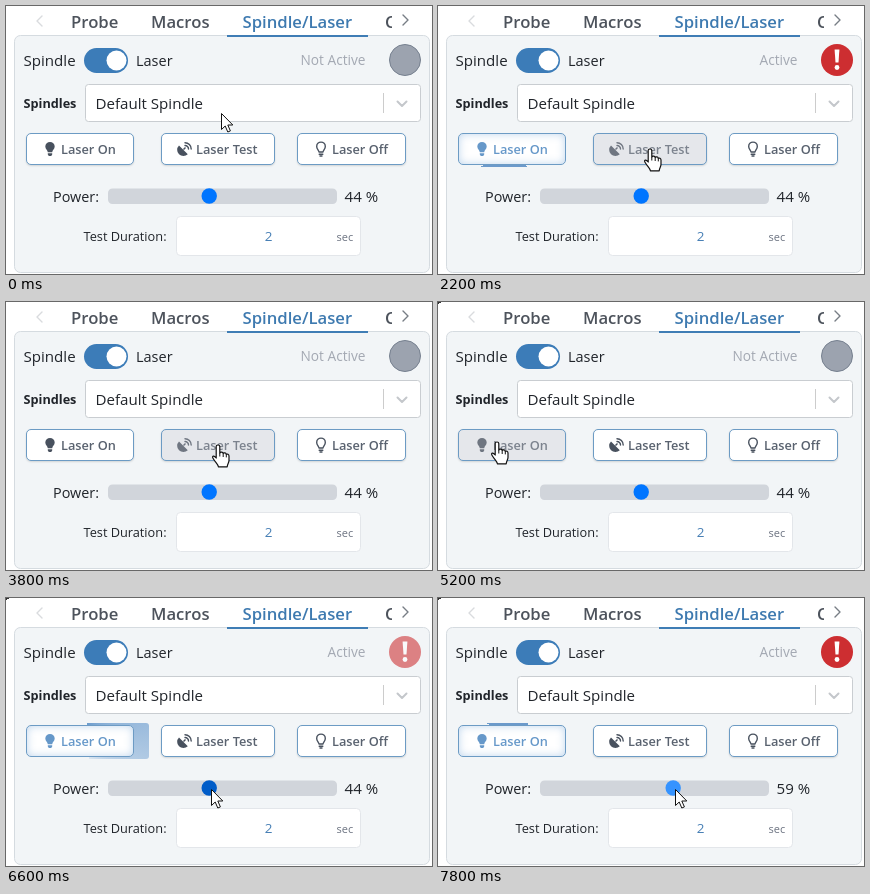
Animation of 426 by 268 pixels, one loop 8 s. Source, as an HTML page:

```html
<!DOCTYPE html>
<html lang="en">
<head>
<meta charset="utf-8">
<title>Laser controls</title>
<style>
  html, body { margin: 0; width: 100%; height: 100%; overflow: hidden; background: #fff; }
  svg { position: absolute; left: 0; top: 0; font-family: "Open Sans", "Noto Sans", sans-serif; font-size: 15.1px; fill: #20242a; }
  .glow { position: absolute; left: 18px; top: 125px; width: 125px; height: 36px; border-radius: 3px; }
  .button {
    position: absolute; top: 127px; height: 32px; box-sizing: border-box;
    border: 1px solid #6c9bc4; border-radius: 5px; background: #fff;
    box-shadow: 0 1px 2px #0002;
  }
  .button.hover { background: #e5e7eb; }
  .button.active { box-shadow: inset 0 0 9px #6fa2d670; }
  .tab { font-weight: 600; font-size: 16.7px; fill: #4d535c; }
  .label { font-weight: 600; font-size: 12.75px; fill: #59626f; }
  .icon { fill: #48515e; stroke: none; }
  .line { fill: none; stroke-width: 1.4; stroke-linecap: round; stroke-linejoin: round; }
  .on .label, .on .icon { fill: #6698c9; }
  .dim { opacity: .75; }
</style>
</head>
<body>
<svg width="426" height="268">
  <rect x="8.5" y="29.5" width="415" height="237" rx="6" fill="#f2f5f7" stroke="#d5dbe0"/>
  <path class="line" d="M36 10l-5 5 5 5" stroke="#d9dbde"/>
  <path class="line" d="M397 9l5 5-5 5" stroke="#777d85"/>
  <g class="tab">
    <text x="65" y="22">Probe</text>
    <text x="145" y="22">Macros</text>
    <text x="236.5" y="22" fill="#3e7ab0" style="fill:#3e7ab0">Spindle/Laser</text>
    <svg x="378" y="0" width="8" height="28"><text x="1" y="22" class="tab">C</text></svg>
  </g>
  <rect x="221" y="29" width="141" height="2" fill="#3f7db5"/>

  <text x="17.5" y="60">Spindle</text>
  <rect x="78" y="42" width="44" height="25" rx="12.5" fill="#3c7cb8"/>
  <circle cx="110.5" cy="54.5" r="10" fill="#fff"/>
  <text x="130" y="60" font-size="14.5">Laser</text>
  <text id="status" x="359.5" y="59" font-size="13.7" text-anchor="end" fill="#a3a8b2"></text>
  <circle id="idle" cx="399" cy="54" r="15.5" fill="#9ca3af" stroke="#76808f"/>
  <g id="alert">
    <circle cx="399" cy="54" r="16" fill="#cd2e31"/>
    <path d="M396.6 43.5h4.8l-.9 13h-3z" fill="#fff"/>
    <circle cx="399" cy="61.5" r="2.4" fill="#fff"/>
  </g>

  <text x="17.5" y="102" font-size="12.7" font-weight="700">Spindles</text>
  <rect x="79.5" y="78.5" width="335" height="37" rx="3" fill="#fff" stroke="#c9cdd1"/>
  <text x="89.5" y="103">Default Spindle</text>
  <path d="M377.5 87v20" stroke="#ccc"/>
  <path class="line" d="M391.5 95.5l4.5 4.5 4.5-4.5" stroke="#c4c7cb" style="stroke-width:2"/>

  <text x="47" y="196" font-size="14.4">Power:</text>
  <rect x="102" y="182.5" width="229" height="15.5" rx="4.5" fill="#d1d5db"/>
  <circle id="thumb" cy="190" r="7.7"/>
  <text id="percent" x="338.5" y="196"></text>
  <text x="77.5" y="235" font-size="12.75">Test Duration:</text>
  <rect x="170.5" y="210.5" width="184" height="39" rx="4" fill="#fff" stroke="#e3e6ea"/>
  <text x="262.5" y="235" font-size="13.5" text-anchor="middle" fill="#477fb5">2</text>
  <text x="330.5" y="235" font-size="11" fill="#6b7280">sec</text>
  <path id="corner" d="M0 0h3v1h-2v1h-1z" fill="#333"/>
</svg>

<div class="glow" id="glow"></div>
<div class="button" id="onButton" style="left:20px;width:108px"></div>
<div class="button" id="testButton" style="left:155px;width:114px"></div>
<div class="button" style="left:291px;width:109px"></div>

<svg width="426" height="268">
  <defs>
    <path id="bulb" d="M-2.2 3.2C-2.4 1.4-4.7.2-4.7-2.4a4.7 4.7 0 0 1 9.4 0C4.7.2 2.4 1.4 2.2 3.2zM-2.2 4.2h4.4v1.4L1.2 7h-2.4l-1-1.4z"/>
  </defs>
  <g id="onLabel">
    <use class="icon" href="#bulb" x="44" y="143"/>
    <text class="label" x="55" y="148">Laser On</text>
  </g>
  <g id="testLabel">
    <path class="icon" d="M173 139.5l8.8 8.8a6.2 6.2 0 0 1-8.8-8.8zM177 143l2-2 1 1-2 2z"/>
    <path class="line" d="M179 139.5a3.5 3.5 0 0 1 3.5 3.5M179 136.8a6.2 6.2 0 0 1 6.2 6.2" stroke="#48515e"/>
    <text class="label" x="190" y="148">Laser Test</text>
  </g>
  <path class="line" d="M313 146c-.2-1.8-2.3-3-2.3-5.6a4.3 4.3 0 0 1 8.6 0c0 2.6-2.1 3.8-2.3 5.6zM313.2 148.2h3.6M314 150h2" stroke="#48515e"/>
  <text class="label" x="326" y="148">Laser Off</text>
  <g id="cursor" stroke="#111" stroke-linejoin="round">
    <path id="arrow" fill="#fff" d="M.5.5v16l3.7-3.5 2.6 6 2.6-1.1-2.6-5.9h5z"/>
    <g id="hand">
      <path fill="#fff" stroke-width="1.2" d="M-1.8 13V1.5C-1.8-.5 1.8-.5 1.8 1.5V8C2.2 6.6 5 6.7 5.2 8.5 5.9 7.3 8.2 7.7 8.3 9.4 9.3 8.6 11 9.2 11 11v4.5c0 2-1.5 3.4-1.8 6.3H.4C.2 19.3-2.5 17.6-5 13.3-6.3 11-4.2 10-1.8 13z"/>
      <path fill="none" d="M1.8 8v3.5M5.2 8.5V12M8.3 9.4v3"/>
    </g>
  </g>
</svg>

<script>
const LOOP = 8000, STEP = 200;
const el = id => document.getElementById(id);
const show = (id, visible) => { el(id).style.display = visible ? "" : "none"; };

// time, cursor tip x, cursor tip y
const route = [
  [0, 215, 107], [200, 216, 112], [800, 212, 143], [3800, 212, 143],
  [4200, 62, 141], [4600, 62, 141], [5200, 59, 140], [5400, 59, 140],
  [5800, 132, 170], [6200, 205, 191], [7000, 205, 191], [7800, 237, 191]
];

function cursorAt(t) {
  const i = route.findIndex(([time]) => time > t);
  if (i < 0) return route.at(-1).slice(1);
  const [t0, x0, y0] = route[i - 1], [t1, x1, y1] = route[i];
  const k = (t - t0) / (t1 - t0);
  return [x0 + (x1 - x0) * k, y0 + (y1 - y0) * k];
}

function render(t) {
  const active = (t >= 1200 && t < 3400) || t >= 5400;
  const phase = t / STEP % 5;
  const faded = phase === 3;
  const [x, y] = cursorAt(t);
  const over = (left, right) => y >= 127 && y < 159 && x >= left && x < right;
  const overOn = over(20, 128), overTest = over(155, 269);

  el("status").textContent = active ? "Active" : "Not Active";
  show("idle", !active);
  show("alert", active);
  el("alert").style.opacity = faded ? .58 : 1;

  show("glow", active);
  const angle = 83 - 72 * (phase - 2);
  el("glow").style.background = faded
    ? `conic-gradient(from ${angle - 8}deg, #6c9ccd, #dce7f2 170deg, transparent 0)`
    : `conic-gradient(from ${angle}deg, #6c9acb 90deg, transparent 0)`;

  el("onButton").className = "button" + (active ? " active" : overOn ? " hover" : "");
  el("testButton").className = "button" + (overTest ? " hover" : "");
  el("onLabel").setAttribute("class", active ? "on" : overOn ? "dim" : "");
  el("testLabel").setAttribute("class", overTest ? "dim" : "");

  const power = Math.round(44 + 15 * Math.max(0, (t - 7000) / 800));
  el("percent").textContent = power + " %";
  el("thumb").setAttribute("cx", 109.5 + power * 2.13);
  el("thumb").setAttribute("fill", t >= 7000 ? "#3593ff" : t >= 6200 ? "#005cc8" : "#0075ff");

  el("cursor").setAttribute("transform", `translate(${Math.round(x)} ${Math.round(y)})`);
  show("hand", overOn || overTest);
  show("arrow", !overOn && !overTest);
  show("corner", t >= 4200);
}

function tick() {
  render(Math.floor(performance.now() % LOOP / STEP) * STEP);
  requestAnimationFrame(tick);
}
tick();
</script>
</body>
</html>
```
